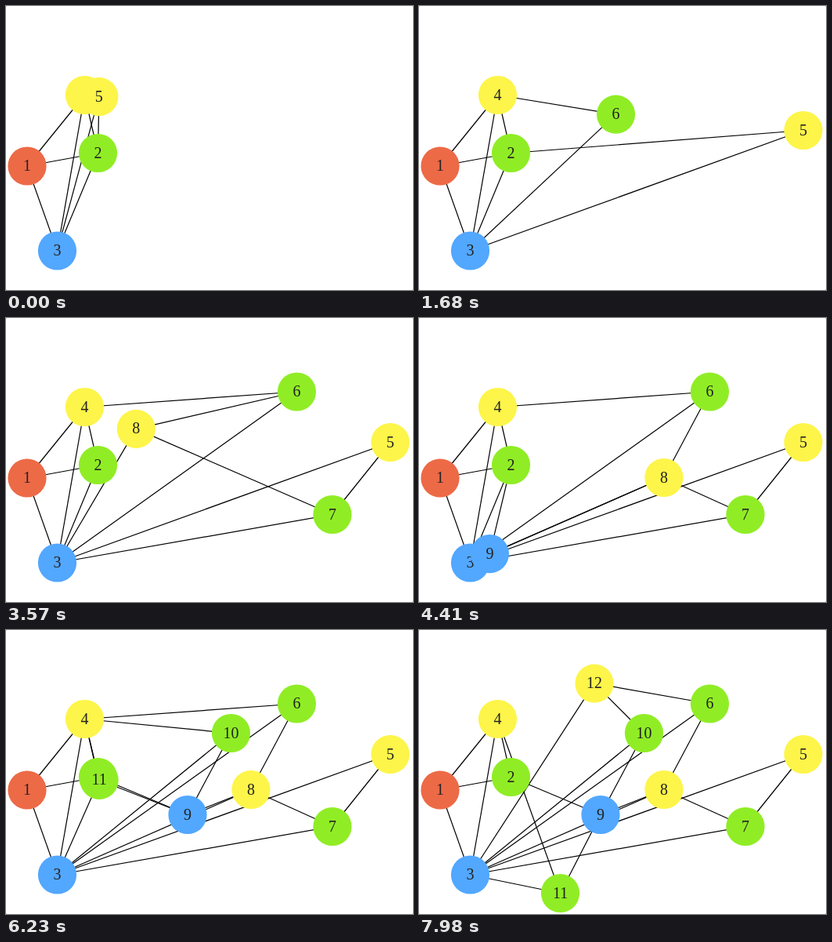
Animation of 520 by 362 pixels, one loop 8 s. Source, as an HTML page:

```html
<!DOCTYPE html>
<html lang="en">
<head>
<meta charset="utf-8">
<title>Growing graph</title>
<style>
  html, body { margin: 0; width: 100%; height: 100%; overflow: hidden; background: #c8c8c8; }
  svg { display: block; width: 520px; height: 362px; background: #fff; border-radius: 2px; }
  line { stroke: #000; stroke-width: 1.2; }
  text { font: 20px "Liberation Serif", "Times New Roman", serif; fill: #222; text-anchor: middle; }
</style>
</head>
<body>
<svg viewBox="0 0 520 362"><g id="links"></g><g id="nodes"></g></svg>
<script>
const LOOP = 8000, STEP = 1050, TRAVEL = 1236, FIRST_START = -267;
const RED = '#ed6a47', GREEN = '#90ed25', BLUE = '#52a7ff', YELLOW = '#fdf549';

// Each later node splits off its parent and travels to its own place.
const nodes = [
  { x: 27, y: 204, color: RED },
  { x: 117.5, y: 187.5, color: GREEN },
  { x: 65.5, y: 312, color: BLUE },
  { x: 100.5, y: 113.5, color: YELLOW },
  { x: 491, y: 158.5, parent: 4 },
  { x: 371.5, y: 94, parent: 2 },
  { x: 417, y: 250.5, parent: 2 },
  { x: 313, y: 203.5, parent: 4 },
  { x: 232, y: 235.5, parent: 3 },
  { x: 287.5, y: 131.5, parent: 2 },
  { x: 180.5, y: 335.5, parent: 2 },
  { x: 334.5, y: 27.5, parent: 4 }
];

// "a-b" lasts forever; "a-b:n" is dropped when node n splits off.
const links = ('1-2 1-3 1-4 2-3:11 2-4 3-4 5-2:7 5-3 6-4:12 6-3 7-5 7-4:8 7-3 ' +
  '8-6 8-7 8-3 9-2 9-8 10-4:12 10-9 10-3 11-4 11-9 11-3 12-6 12-10 12-3')
  .split(' ').map(entry => {
    const [a, b, end = Infinity] = entry.split(/[-:]/).map(Number);
    return { a, b, end };
  });

function add(parent, name, attributes = {}) {
  const element = document.createElementNS('http://www.w3.org/2000/svg', name);
  for (const key in attributes) element.setAttribute(key, attributes[key]);
  return parent.appendChild(element);
}

const show = (element, visible) => element.style.display = visible ? '' : 'none';
const startOf = id => id < 5 ? -Infinity : FIRST_START + (id - 5) * STEP;
const node = id => nodes[id - 1];

const linkLayer = document.getElementById('links');
const nodeLayer = document.getElementById('nodes');

for (const link of links) link.element = add(linkLayer, 'line');

nodes.forEach((item, index) => {
  const color = item.color || node(item.parent).color;
  item.element = add(nodeLayer, 'g');
  add(item.element, 'circle', { r: 24.6, fill: color });
  add(item.element, 'text', { y: 6 }).textContent = index + 1;
});

function position(item, id, time) {
  if (!item.parent) return { x: item.x, y: item.y };
  const progress = Math.min(1, Math.max(0, (time - startOf(id)) / TRAVEL));
  const eased = progress * progress;
  const from = node(item.parent);
  return {
    x: from.x + (item.x - from.x) * eased,
    y: from.y + (item.y - from.y) * eased
  };
}

function draw(time) {
  const places = nodes.map((item, index) => position(item, index + 1, time));
  nodes.forEach((item, index) => {
    const { x, y } = places[index];
    item.element.setAttribute('transform', `translate(${x} ${y})`);
    show(item.element, time >= startOf(index + 1));
  });
  for (const { a, b, end, element } of links) {
    const p = places[a - 1], q = places[b - 1];
    element.setAttribute('x1', p.x);
    element.setAttribute('y1', p.y);
    element.setAttribute('x2', q.x);
    element.setAttribute('y2', q.y);
    show(element, time >= startOf(Math.max(a, b)) && time < startOf(end));
  }
}

const origin = performance.now();
function tick() {
  draw((performance.now() - origin) % LOOP);
  requestAnimationFrame(tick);
}
tick();
</script>
</body>
</html>
```
